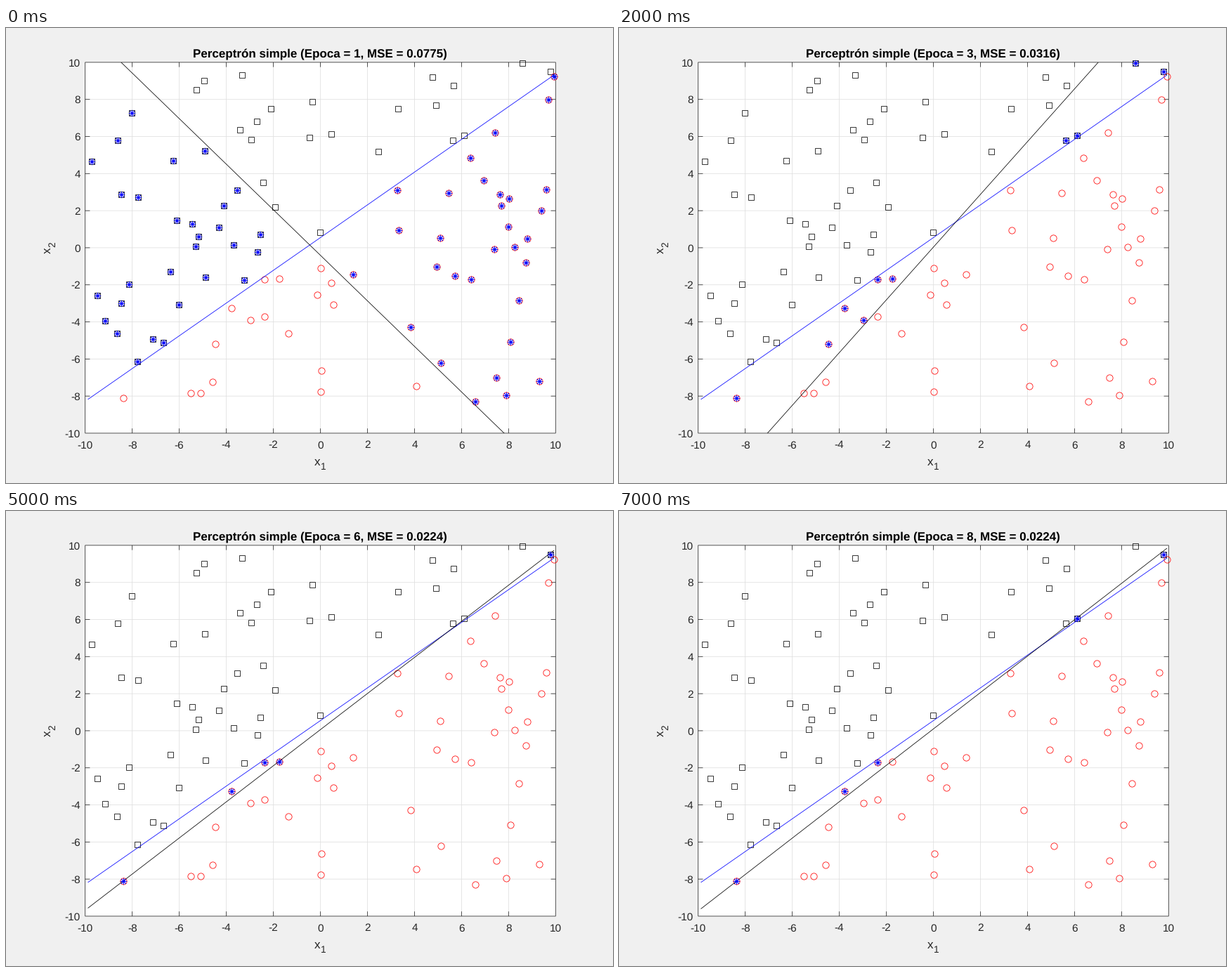
These frames come from a looping animation (864 px wide and 648 px high, 8 s). A matplotlib script:

```python
import matplotlib.pyplot as plt
import numpy as np
from matplotlib.animation import FuncAnimation
from matplotlib.patches import Rectangle

plt.rcParams["font.family"] = "Liberation Sans"
plt.rcParams["text.hinting"] = "no_hinting"

W, H = 864, 648
PT = W / 560  # stage pixels per plot point
HAIR = 0.5 * PT
LEFT, TOP, RIGHT, BOTTOM = 112.7, 48.9, 782.3, 577
X_MIN, X_MAX = 116.5, 780  # horizontal extent of the samples
INK = "#262626"

# Lines are given by their heights at X_MIN and X_MAX, in pixels, y down.
divider = (529, 67)
boundaries = [(3, 645.8), (1506.8, -884.4), (683.4, -60.9), (556, 67.9),
              (551.3, 72.2), (565.6, 56), (520.2, 102.2), (566.6, 53)]

# Samples close to the divider, which decide the later epochs
close_calls = [(735, 49.5), (775, 61.5), (652, 153), (636, 160),
               (780, 69), (771.5, 102), (695.5, 148.5), (557, 231),
               (388.5, 356.5), (368, 358), (320.5, 398.5), (347.5, 415.5),
               (298, 450), (166.5, 526.5)]


def below(points, line):
    x, y = np.asarray(points).T
    return y > line[0] + (x - X_MIN) * (line[1] - line[0]) / (X_MAX - X_MIN)


def misses(points, line):
    return below(points, line) != below(points, divider)


def scatter_samples(seed=4, gap=13):
    """Add random samples: so many per class and set of epochs that miss them."""
    quota = {(False, (0,)): 29, (False, (1,)): 5, (False, ()): 13,
             (True, (0,)): 27, (True, (1,)): 5, (True, ()): 7}
    rng = np.random.default_rng(seed)
    points = list(close_calls)
    while any(quota.values()):
        p = rng.uniform((X_MIN, 50), (X_MAX, 538))
        missed = tuple(i for i, line in enumerate(boundaries) if misses(p, line))
        kind = bool(below(p, divider)), missed
        spaced = np.hypot(*(np.array(points) - p).T).min() > gap
        if quota.get(kind) and spaced:
            quota[kind] -= 1
            points.append(tuple(p))
    return np.array(points)


fig = plt.figure(figsize=(W / 72, H / 72), dpi=72, facecolor="#f0f0f0")
ax = fig.add_axes([0, 0, 1, 1])
ax.set_xlim(0, W)
ax.set_ylim(H, 0)
ax.axis("off")


def label(x, y, text, size, **style):
    style = {"color": INK, "ha": "center", "va": "baseline", **style}
    return ax.text(x, y, text, fontsize=size * PT, **style)


def segment(xs, ys, color=INK, z=2):
    return ax.plot(xs, ys, color=color, lw=HAIR, zorder=z, snap=False,
                   solid_capstyle="butt")[0]


def markers(points, shape, size, color, z):
    return ax.plot(points[:, 0], points[:, 1], ls="", marker=shape,
                   ms=size * PT, mfc="none", mec=color, mew=HAIR,
                   snap=False, zorder=z)[0]


def draw_axes():
    box = (LEFT, TOP), RIGHT - LEFT, BOTTOM - TOP
    ax.add_patch(Rectangle(*box, fc="white", ec="none", zorder=0))
    ax.add_patch(Rectangle(*box, fc="none", ec=INK, lw=HAIR, snap=False, zorder=3))
    tick = 6.7
    for i, value in enumerate(range(-10, 11, 2)):
        x = LEFT + (RIGHT - LEFT) * i / 10
        y = BOTTOM - (BOTTOM - TOP) * i / 10
        if 0 < i < 10:
            segment([x, x], [TOP, BOTTOM], "#dfdfdf", z=1)
            segment([LEFT, RIGHT], [y, y], "#dfdfdf", z=1)
            segment([x, x], [BOTTOM, BOTTOM - tick])
            segment([x, x], [TOP, TOP + tick])
            segment([LEFT, LEFT + tick], [y, y])
            segment([RIGHT, RIGHT - tick], [y, y])
        label(x, 598.5, str(value), 10)
        label(106, y + 5.5, str(value), 10, ha="right")
    label(443.5, 623, "x", 11)
    label(452, 629, "1", 8.8)
    upright = {"rotation": 90, "ha": "right", "va": "center"}
    label(67, 316.5, "x", 11, **upright)
    label(73, 308, "2", 8.8, **upright)


samples = scatter_samples()
is_circle = below(samples, divider)

draw_axes()
markers(samples[~is_circle], "s", 4.8, "black", 4)
markers(samples[is_circle], "o", 6, "red", 4)
segment([X_MIN, X_MAX], divider, "blue", 5)
boundary = segment([], [], "black", 5)
boundary.set_clip_path(Rectangle((LEFT, TOP), RIGHT - LEFT, BOTTOM - TOP,
                                 transform=ax.transData))
errors = markers(np.empty((0, 2)), (8, 2, 0), 6, "blue", 6)
title = label(447.2, 42.5, "", 11, color="black", weight="bold")


def draw(epoch):
    line = boundaries[epoch]
    wrong = samples[misses(samples, line)]
    boundary.set_data([X_MIN, X_MAX], line)
    errors.set_data(wrong[:, 0], wrong[:, 1])
    mse = np.sqrt(len(wrong)) / 100
    title.set_text(f"Perceptrón simple (Epoca = {epoch + 1}, MSE = {mse:.4f})")
    return boundary, errors, title


anim = FuncAnimation(fig, draw, frames=len(boundaries), interval=1000, repeat=True)
plt.show()
```
